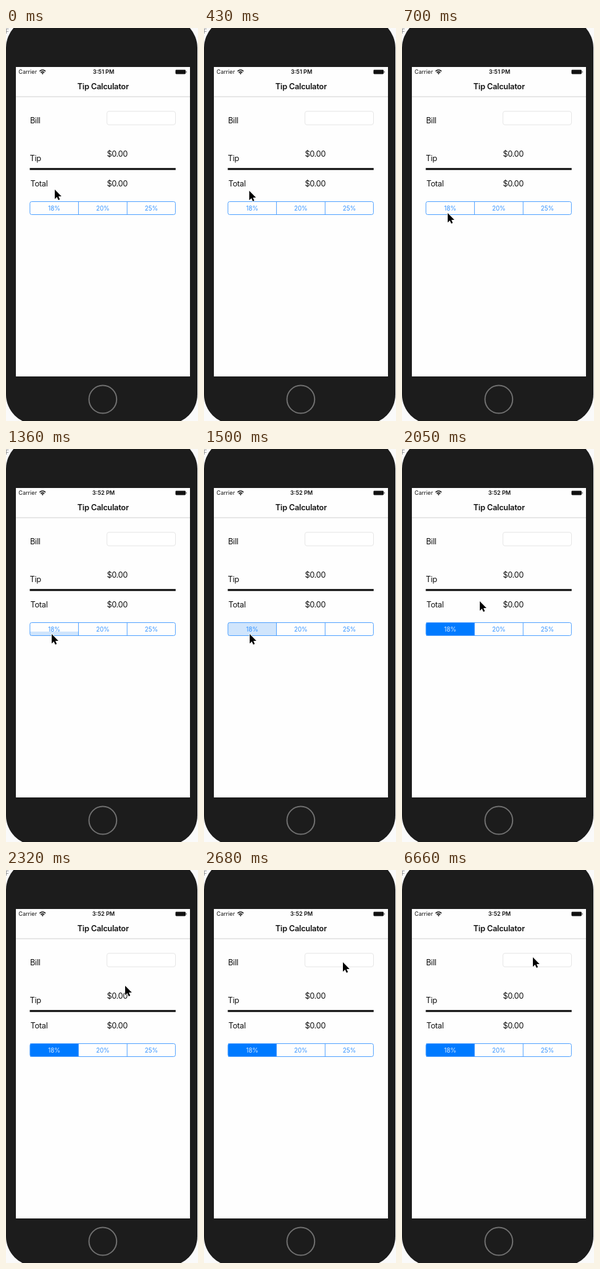
Animation of 311 by 635 pixels, one loop 8000 ms. Source, as an HTML page:

```html
<!DOCTYPE html>
<html lang="en">
<head>
<meta charset="utf-8">
<title>Tip Calculator</title>
<style>
  html, body { margin: 0; width: 100%; height: 100%; overflow: hidden; background: #fff; }
  svg { display: block; width: 100vw; height: 100vh; }
  text { font-family: Inter, "Open Sans", sans-serif; fill: #111; }
  .label { font-size: 12.8px; letter-spacing: -.02em; }
  .amount { font-size: 12.8px; letter-spacing: -.03em; }
  .title { font-size: 12.8px; font-weight: 600; letter-spacing: -.018em; }
  .status { font-size: 9.1px; }
  .seg { font-size: 9.8px; fill: #3292ff; }
  .mid { text-anchor: middle; }
</style>
</head>
<body>
<svg viewBox="0 0 311 635" preserveAspectRatio="none">
  <rect width="311" height="635" fill="#fafafa"/>
  <text x="-1" y="9" font-size="10" style="fill:#888">F</text>
  <rect x="0" y="-16" width="310" height="656" rx="48" fill="#1c1c1c"/>
  <circle cx="156.8" cy="600" r="22.4" fill="none" stroke="#707070" stroke-width="2"/>
  <rect x="16" y="63" width="282" height="500" fill="#fefefe"/>

  <text class="status" x="20.3" y="74.2">Carrier</text>
  <g fill="none" stroke="#111" stroke-width="1.5">
    <path d="M54.4 69.9Q59.2 65.7 64 69.9"/>
    <path d="M56.3 72.1Q59.2 69.6 62.1 72.1"/>
  </g>
  <path d="M57.6 73.2Q59.2 72 60.8 73.2L59.2 75Z" fill="#111"/>
  <text class="status mid" id="clock" x="158" y="74.2" font-weight="600"></text>
  <rect x="274.5" y="67.5" width="16.5" height="7" rx="1.4" fill="#111"/>
  <rect x="291.7" y="69.7" width="1.2" height="2.6" rx=".6" fill="#555"/>

  <text class="title mid" x="157.2" y="99">Tip Calculator</text>
  <path d="M16 111H298" stroke="#cfcfcf"/>

  <text class="label" x="39" y="153.7">Bill</text>
  <rect x="163.5" y="134.5" width="111" height="22" rx="3.5" fill="#fff" stroke="#e6e6e6"/>
  <text class="label" x="38.4" y="215">Tip</text>
  <text class="amount" x="163.4" y="207.5">$0.00</text>
  <rect x="38.5" y="226.3" width="236.3" height="3.1" fill="#0a0a0a"/>
  <text class="label" x="39.4" y="255.5">Total</text>
  <text class="amount" x="163.4" y="255.5">$0.00</text>

  <path id="fill"/>
  <g fill="none" stroke="#4b9fff">
    <rect x="38.8" y="280.5" width="235.6" height="21" rx="2.8"/>
    <path d="M117.4 280.5V301.5M196.2 280.5V301.5"/>
  </g>
  <text class="seg mid" id="first" x="78" y="295">18%</text>
  <text class="seg mid" x="156.8" y="295">20%</text>
  <text class="seg mid" x="235.4" y="295">25%</text>

  <path id="cursor" d="M0 0V15.2L3.5 11.9L5.8 17L8.2 16L6 11H10.8Z"
        fill="#000" stroke="#fff" stroke-width="1.6" stroke-linejoin="round" paint-order="stroke"/>
</svg>
<script>
const LOOP = 8000;
const $ = id => document.getElementById(id);
const clock = $('clock'), fill = $('fill'), first = $('first'), cursor = $('cursor');

// [start ms, tip x, tip y]; the pointer jumps between samples
const moves = [
  [0, 79, 261], [160, 73.3, 262], [430, 73.3, 263], [580, 73.6, 281], [700, 74, 299],
  [1900, 77.5, 294.5], [2050, 126, 246], [2170, 178.3, 195.2], [2320, 193, 187],
  [2440, 208, 170], [2560, 219, 156], [2680, 225, 149], [6660, 212, 141]
];

// [start ms, top of the tint, colour]
const tints = [
  [0, 301.5, 'none'], [1360, 295, '#d0e5fc'], [1500, 280.5, '#d0e5fc'], [1630, 280.5, '#007aff']
];

const at = (list, t) => list.findLast(step => step[0] <= t);

function render(t) {
  const [, x, y] = at(moves, t);
  cursor.setAttribute('transform', `translate(${x} ${y})`);

  const [, top, colour] = at(tints, t);
  fill.setAttribute('d', `M39 ${top}H117.4V301.5H39Z`);
  fill.setAttribute('fill', colour);
  first.style.fill = t >= 1630 ? '#dcecff' : '';

  clock.textContent = t < 1360 ? '3:51 PM' : '3:52 PM';
}

const start = performance.now();
function tick() {
  render((performance.now() - start) % LOOP);
  requestAnimationFrame(tick);
}
tick();
</script>
</body>
</html>
```
